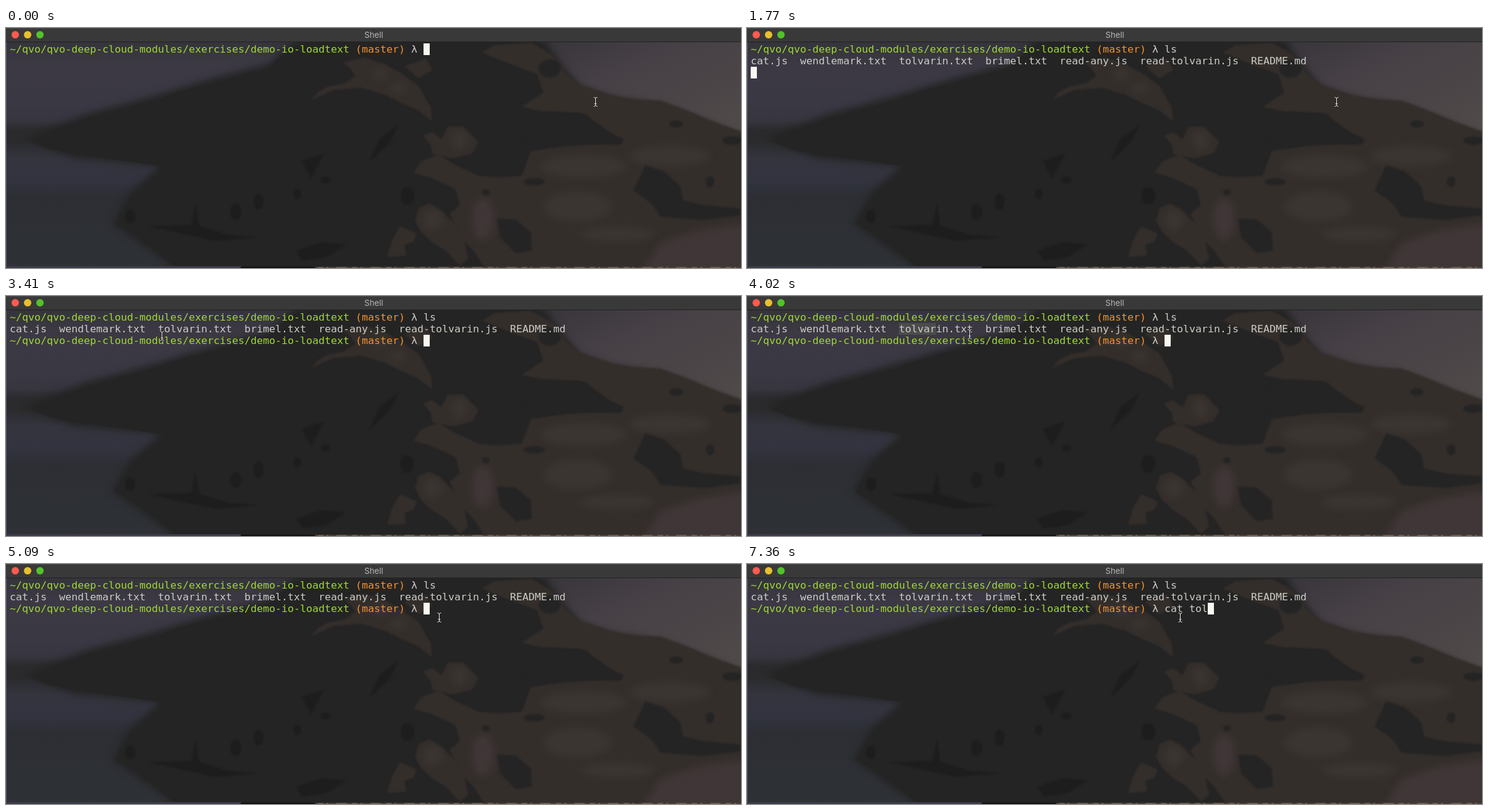
Animation of 1190 by 390 pixels, one loop 8000 ms. Source, as an HTML page:

```html
<!DOCTYPE html>
<html lang="en">
<head>
<meta charset="utf-8">
<title>Shell</title>
<style>
  html, body { margin: 0; width: 100%; height: 100%; overflow: hidden; background: #242424; }
  svg {
    display: block; width: 1190px; height: 390px;
    background:
      linear-gradient(155deg, #37343a 10%, #464046 40%, #4b4447 65%, #524b4a) 100% 0 / 350px 180px no-repeat,
      linear-gradient(#35343b 22px, #3c3944 60px, #3a3843 125px, #37353e 150px, #2b2b2d 166px, #2b2b2d 184px,
        #33343e 212px, #32333e 248px, #2c2e33 278px, #2e3136 388px);
  }
  text { font: 16.61px "DejaVu Sans Mono", monospace; white-space: pre; fill: #cdcdc6; }
  .title { font: 13.2px Inter, sans-serif; fill: #b6b6b6; text-anchor: middle; }
  .path { fill: #a0da2f; }
  .branch { fill: #f8922a; }
  .soft { filter: blur(6px); }
  .hazy { filter: blur(1.5px); }
  .dark { fill: #242424; }
  .rock { fill: #342e2b; }
  .pale { fill: #3b3532; }
  .rosy { fill: #403637; }
  .shade { fill: #1d1d1e; }
  #pointer path { fill: none; stroke: #f4f4f4; }
  #pointer path:first-child { stroke: #1a1a1a; stroke-width: 2.6; }
</style>
</head>
<body>
<svg viewBox="0 0 1190 390">
  <!-- Hillside behind the translucent window -->
  <path class="dark soft" d="M470 18 425 58 340 80 240 110 130 140 30 180 110 211 250 224 200 268 172 318 240 366 280 396H1196V176L1100 138 1060 124 980 112 930 94 905 66 870 18Z"/>
  <path class="dark" d="M490 22Q455 32 432 58 420 72 390 74L340 88 280 103 240 118 190 132 130 148 90 163 40 184 70 197 110 205 200 217 262 226 235 248 205 272 188 295 176 318 205 335 240 360 275 390H1190V172L1060 124 980 112 930 96 905 70 850 22Z"/>
  <g class="rock hazy">
    <path d="M790 28 850 24 882 42 907 73 930 93 980 109 1015 116 1060 118 1100 133 1150 154 1190 168V390H775L757 362 740 345 718 302 735 288 728 262 690 244 660 235 672 217 700 206 730 224 765 240 795 243 835 240 850 200 905 192 1000 186 985 175 950 150 930 138 880 138 835 128 870 105 860 75 820 60 770 40Z"/>
    <path d="M494 117 505 104 522 95 548 90 566 78 556 64 546 56 580 48 612 58 642 75 668 94 688 130 690 152 668 134 640 122 612 108 575 97 530 101Z"/>
    <path d="M675 175 690 169 705 181 715 160 740 160 765 185 755 204 725 212 690 205 688 190Z"/>
    <path d="M617 372 625 345 638 322 665 334 660 347 645 352 648 370Z"/>
    <path d="M662 312 668 292 686 285 704 296 724 316 742 346 748 375 735 386 712 362 690 348 672 332Z"/>
    <path d="M645 62 680 50 690 68 668 82Z"/>
  </g>
  <g class="pale soft">
    <ellipse cx="1075" cy="208" rx="65" ry="16"/>
    <ellipse cx="935" cy="225" rx="70" ry="18"/>
    <ellipse cx="691" cy="312" rx="15" ry="16"/>
    <ellipse cx="925" cy="290" rx="55" ry="24"/>
    <ellipse cx="990" cy="335" rx="60" ry="12"/>
    <ellipse cx="734" cy="183" rx="12" ry="15"/>
    <ellipse cx="605" cy="75" rx="12" ry="9"/>
    <ellipse cx="635" cy="98" rx="14" ry="8"/>
  </g>
  <g class="rosy soft">
    <ellipse cx="772" cy="310" rx="17" ry="34"/>
    <path d="M1196 318 1120 330 1060 350 1030 396H1196Z"/>
  </g>
  <g class="dark hazy">
    <path d="M833 165 845 145 880 135 940 140 960 165 1000 180 995 190 930 188 870 193 840 185Z"/>
    <path d="M1016 264 1035 223 1065 233 1092 257 1096 280 1130 288 1190 293V304L1130 312 1060 307 1045 285Z"/>
    <path d="M795 310 825 311 850 332 851 362 825 366 800 340Z"/>
    <ellipse cx="880" cy="66" rx="18" ry="15"/>
    <ellipse cx="1085" cy="156" rx="11" ry="6"/>
    <ellipse cx="1176" cy="183" rx="16" ry="7"/>
    <ellipse cx="1140" cy="250" rx="7" ry="9"/>
    <ellipse cx="855" cy="250" rx="17" ry="6"/>
    <ellipse cx="777" cy="267" rx="6" ry="5"/>
  </g>
  <g class="shade hazy">
    <path d="M479 216 515 204 494 244Z"/>
    <path d="M635 158 622 185 588 218 605 180Z"/>
    <path d="M230 322 300 320 307 285 313 322 360 336 410 340 340 346Z"/>
    <path d="M470 362 510 348 550 352 520 372 480 378Z"/>
    <ellipse cx="409" cy="282" rx="8" ry="13"/>
    <ellipse cx="372" cy="299" rx="9" ry="13"/>
    <ellipse cx="201" cy="306" rx="8" ry="11"/>
    <ellipse cx="472" cy="270" rx="6" ry="8"/>
    <ellipse cx="650" cy="273" rx="11" ry="14"/>
    <ellipse cx="517" cy="247" rx="8" ry="6"/>
  </g>

  <!-- Window frame -->
  <path d="M0 388.5H380" stroke="#3d3c49" stroke-width="3"/>
  <path d="M380 389H500" stroke="#100f10" stroke-width="2"/>
  <path d="M500 389H1190" stroke="#4a3d35" stroke-width="2"/>
  <path d="M505 389H1190" stroke="#8b7766" stroke-dasharray="9 5 3 13 17 8"/>
  <path d="M.5 22V388" stroke="#5a5470"/>
  <rect width="1190" height="22" fill="#393939"/>
  <path d="M0 .5H1190" stroke="#4a4a4a"/>
  <path d="M0 22.5H1190" stroke="#222"/>
  <circle cx="15" cy="11" r="6" fill="#ff5b51"/>
  <circle cx="35" cy="11" r="6" fill="#e6c02f"/>
  <circle cx="55" cy="11" r="6" fill="#53c22b"/>
  <text class="title" x="595.5" y="16">Shell</text>

  <!-- Terminal -->
  <rect id="selection" x="246" y="44" height="19" fill="#4c4c4c"/>
  <text id="row0" x="6" y="40"></text>
  <text id="row1" x="6" y="59"></text>
  <text id="row2" x="6" y="78"></text>
  <rect id="cursor" width="10" height="19" fill="#f8f8f0"/>
  <g id="pointer"></g>
</svg>
<script>
const LOOP = 8000, CELL = 10, LEFT = 6, TOP = 25, LINE = 19, PROMPT_COLS = 67;
const byId = id => document.getElementById(id);
const prompt = '<tspan class="path">~/qvo/qvo-deep-cloud-modules/exercises/demo-io-loadtext</tspan>' +
  ' <tspan class="branch">(master)</tspan> λ ';
const listing = ['cat.js', 'wendlemark.txt', 'tolvarin.txt', 'brimel.txt', 'read-any.js',
  'read-tolvarin.js', 'README.md'].join('  ');
const listedAt = 1770, promptAt = 1830;
const firstKeys = [960, 1050];
const secondKeys = [5870, 5930, 6160, 6280, 6820, 7000, 7360];
// Selected characters from each moment on
const selections = [[3890, 1], [3950, 3], [4020, 6], [4100, 12], [4680, 0]];

const easeInOut = p => p * p * (3 - 2 * p);
const easeOut = p => 1 - (1 - p) ** 2;
const moves = [
  { start: 2780, end: 2950, steps: 4, to: [454, 51], ease: easeInOut },
  { start: 3130, end: 3410, steps: 6, to: [253, 65], ease: easeInOut },
  { start: 3465, end: 3640, steps: 4, to: [245, 59], ease: easeOut },
  { start: 3820, end: 4020, steps: 4, to: [361, 62], ease: easeInOut },
  { start: 4100, end: 4300, steps: 4, to: [382, 60], ease: easeOut },
  { start: 4680, end: 5090, steps: 8, to: [702, 87], ease: easeInOut },
];

const beam = 'M-3-7.5Q0-7.5 0-5V5Q0 7.5-3 7.5M3-7.5Q0-7.5 0-5M0 5Q0 7.5 3 7.5M-2 3H2';
byId('pointer').innerHTML = `<path d="${beam}"/>`.repeat(2);

function pointerAt(t) {
  let pos = [955, 120];
  for (const { start, end, steps, to, ease } of moves) {
    if (t < start) break;
    const step = Math.min(steps, 1 + Math.floor((t - start) / (end - start) * (steps - 1) + 0.001));
    const p = ease(step / steps);
    pos = pos.map((v, i) => Math.round(v + (to[i] - v) * p));
  }
  return pos;
}

const typed = (keys, t) => keys.filter(k => t >= k).length;

const shown = {};
function setRow(id, html) {
  if (shown[id] !== html) byId(id).innerHTML = shown[id] = html;
}

function setAttrs(id, attrs) {
  for (const name in attrs) byId(id).setAttribute(name, attrs[name]);
}

function draw(t) {
  const first = typed(firstKeys, t), second = typed(secondKeys, t);
  setRow('row0', prompt + 'ls'.slice(0, first));
  setRow('row1', t >= listedAt ? listing : '');
  setRow('row2', t >= promptAt ? prompt + 'cat tol'.slice(0, second) : '');

  const row = t >= listedAt ? 2 : 0;
  const col = t < listedAt ? PROMPT_COLS + first : t < promptAt ? 0 : PROMPT_COLS + second;
  setAttrs('cursor', { x: LEFT + col * CELL, y: TOP + row * LINE });

  const selected = selections.reduce((n, [at, count]) => t >= at ? count : n, 0);
  setAttrs('selection', { width: selected * CELL });

  const [x, y] = pointerAt(t);
  setAttrs('pointer', { transform: `translate(${x - 0.5} ${y})` });
}

function tick() {
  draw(performance.now() % LOOP);
  requestAnimationFrame(tick);
}
tick();
</script>
</body>
</html>
```
